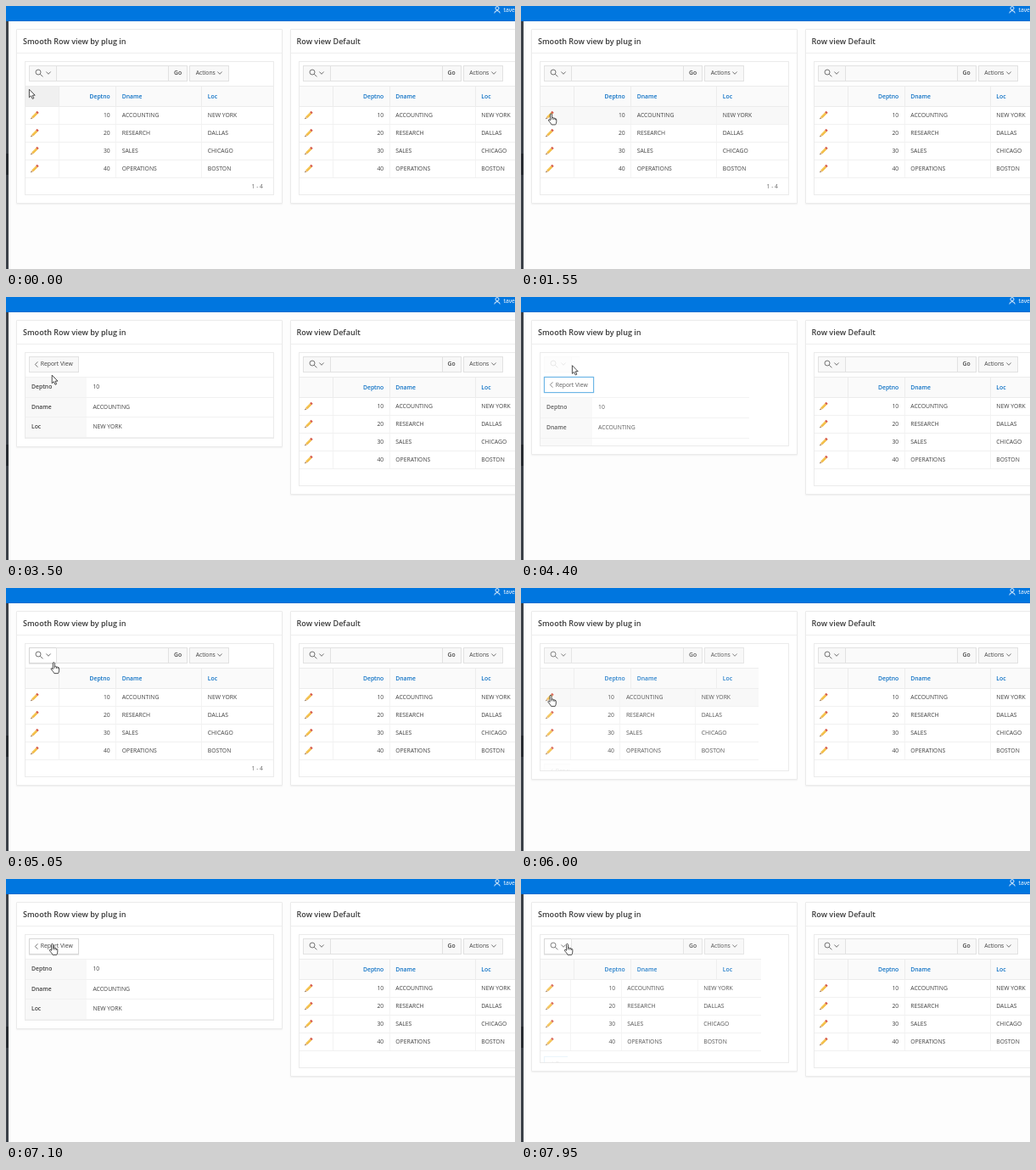
Animation of 600x310 px, one loop 8 s. Source, as an HTML page:

```html
<!DOCTYPE html>
<html lang="en">
<head>
<meta charset="utf-8">
<title>Smooth row view</title>
<style>
  * { box-sizing: border-box; }
  html, body { margin: 0; width: 100%; height: 100%; overflow: hidden; }
  body { background: #fdfdfd; color: #404040; font: 6.8px/1 "Open Sans", "Noto Sans", sans-serif; }
  #stage { position: relative; width: 600px; height: 310px; overflow: hidden; }
  svg { display: block; flex: none; fill: none; overflow: visible; }

  .bar { position: absolute; inset: 0 0 auto; height: 18px; background: #0076df; border-bottom: 1px solid #056dd0; }
  .user { position: absolute; left: 575px; top: 0; display: flex; gap: 3.5px; color: #fff; white-space: nowrap; }
  .user svg { width: 8px; height: 9px; stroke: #fff; stroke-width: .9; }
  .user span { line-height: 9px; }
  .side { position: absolute; left: 0; top: 18px; bottom: 0; width: 3px;
    background: linear-gradient(#3b4048 156px, #262a30 156px 181px, #3b4048 181px); }

  .card { position: absolute; top: 27px; width: 314px; padding: 0 9px 9px; background: #fff;
    border: 1px solid #ebebeb; border-radius: 1px; box-shadow: 0 1px 2px #0000000f; }
  .card h2 { margin: 0 -9px 9px; height: 28px; padding-left: 7px; border-bottom: 1px solid #efefef;
    font-size: 9.05px; font-weight: 600; line-height: 27px; color: #393939; }
  .panel { width: 294px; border: 1px solid #ebebeb; }

  .report, .detail { position: relative; overflow: hidden; --s: 1;
    width: calc(292px * var(--s)); height: calc(var(--h) * var(--s)); opacity: var(--s); }
  .report { --h: 156px; }
  .detail { --h: 100px; }
  .moving .report { --s: var(--report); }
  .moving .detail { --s: calc(1 - var(--report)); }

  .btn { position: absolute; top: 4px; height: 19px; display: flex; align-items: center; justify-content: center;
    gap: 2.5px; padding-top: .5px; background: #f8f8f8; border: 1px solid #e2e2e2; white-space: nowrap; }
  .btn svg { stroke: #666; stroke-width: .9; margin-top: -1px; }
  .btn.hover { background: #fff; border-color: #d6d6d6; box-shadow: 0 1px 1px #00000014; }
  .btn.focus { background: #fff; border-color: #52a9e2; box-shadow: 0 0 1px #52a9e2; }
  .input { background: #fafafa; }
  .go { font-weight: 600; }

  .row { display: flex; height: 21px; border-bottom: 1px solid #f1f1f1; }
  .cell { display: flex; align-items: center; padding: 0 6.5px; border-left: 1px solid #f3f3f3; white-space: nowrap; min-width: 0; }
  .cell:nth-child(1) { width: 13.45%; border-left: 0; padding: 0 6px; }
  .cell:nth-child(2) { width: 22.95%; justify-content: flex-end; }
  .cell:nth-child(3) { width: 34.6%; }
  .cell:nth-child(4) { width: 29%; }
  .head { position: relative; margin-top: 28px; width: 292px; height: 25px; background: #fafafa;
    border: solid #ececec; border-width: 1px 0; color: #0a6fc4; font-weight: 600; }
  .head .cell { border-color: #ececec; padding-top: 1px; }
  .cell.hover { background: #f0f0f0; }
  .row.hover { background: #f8f8f8; }
  .pencil { width: 10px; height: 11px; margin-top: -1px; }
  .foot { height: 19px; line-height: 19px; padding-right: 12px; text-align: right; color: #666; white-space: nowrap; }

  .fields { margin-top: 28px; border-top: 1px solid #f1f1f1; }
  .field { display: flex; height: 23.67px; border-bottom: 1px solid #f1f1f1; white-space: nowrap; }
  .field > * { display: flex; align-items: center; padding-left: 7px; }
  .field b { width: 24.8%; font-weight: 600; background: #f8f8f8; }
  .field.hover { background: #f5f5f5; }
  .field.hover b { background: #eee; }

  #cursor { position: absolute; left: 0; top: 0; pointer-events: none; stroke: #222; stroke-width: .8; fill: #fff; stroke-linejoin: round; }
  #cursor .hand, #cursor.pointing .arrow { display: none; }
  #cursor.pointing .hand { display: inline; }
</style>
</head>
<body>
<div id="stage">
  <div class="side"></div>
  <div class="bar"></div>
  <div class="user">
    <svg viewBox="0 0 8 9"><circle cx="4" cy="2.6" r="2"/><path d="M.8 8.4Q1 5.6 4 5.6T7.2 8.4"/></svg>
    <span>taven</span>
  </div>
  <svg id="cursor" width="12" height="16">
    <path class="arrow" d="M.4.2V9.8L2.6 7.8 4.2 11.4 5.8 10.7 4.3 7.2H7.2Z"/>
    <path class="hand" transform="translate(-4)" d="M3 1.5Q3 .4 4 .4T5 1.5V5.2Q6.9 4.6 7.2 5.7 8.6 5.3 8.9 6.3 10.3 6.1 10.3 7.5V10Q10.2 12 9.2 13.4H4.6Q3.4 11.2 1 8.6 .6 7.4 1.6 7.3 2.4 7.4 3 8.4ZM5 5.2V7.4M7.2 5.7V7.6M8.9 6.3V7.8"/>
  </svg>
</div>
<script>
const LOOP = 8000, FADE = 800;
const stage = document.getElementById('stage');
const cursor = document.getElementById('cursor');

const departments = [
  [10, 'ACCOUNTING', 'NEW YORK'],
  [20, 'RESEARCH', 'DALLAS'],
  [30, 'SALES', 'CHICAGO'],
  [40, 'OPERATIONS', 'BOSTON'],
];
const columns = ['Deptno', 'Dname', 'Loc'];

const icon = (w, h, d) => `<svg width="${w}" height="${h}"><path d="${d}"/></svg>`;
const chevron = icon(6, 4, 'M.4.5L3 3.3 5.6.5');
const lens = icon(10, 10, 'M7 4A3 3 0 1 1 1 4 3 3 0 0 1 7 4M6.2 6.2L9.4 9.4');
const back = icon(4, 7, 'M3.4.3L.4 3.5 3.4 6.7');
const pencil = `<svg class="pencil hit" viewBox="0 0 10 11" pointer-events="bounding-box">
  <rect width="10" height="11"/>
  <path d="M2.3 8.2L7.3 3.2" stroke="#f3bd45" stroke-width="2.8"/>
  <path d="M2 7.3L6.5 2.8" stroke="#fadb85" stroke-width=".8"/>
  <path d="M7.2 3.3L8.7 1.8" stroke="#d65a4a" stroke-width="2.8"/>
  <path d="M1.2 7.3L3.2 9.3.3 10.2Z" fill="#e3b27c"/><path d="M.7 8.9L1.7 9.8.2 10.3Z" fill="#4a3a30"/></svg>`;

const button = (left, width, body, cls = 'hit') =>
  `<div class="btn ${cls}" style="left:${left}px;width:${width}px">${body}</div>`;
const row = (cells, cls, cellCls = '') =>
  `<div class="row ${cls}">${cells.map(c => `<div class="cell ${cellCls}">${c}</div>`).join('')}</div>`;

const report = `<div class="report">
  ${button(4, 33, lens + chevron)}${button(36, 133, '', 'input')}
  ${button(168, 23, 'Go', 'hit go')}${button(193, 47, 'Actions' + chevron)}
  ${row(['', ...columns], 'head', 'spot')}
  ${departments.map(d => row([pencil, ...d], 'spot')).join('')}
  <div class="foot">1 - 4</div></div>`;

const detail = `<div class="detail">
  ${button(4, 59, back + 'Report View', 'hit back')}
  <div class="fields">${columns.map((name, i) =>
    `<div class="field spot"><b>${name}</b><span>${departments[0][i]}</span></div>`).join('')}</div></div>`;

function addCard(left, title, content) {
  const card = document.createElement('section');
  card.className = 'card';
  card.style.left = left + 'px';
  card.innerHTML = `<h2>${title}</h2><div class="panel">${content}</div>`;
  stage.insertBefore(card, cursor);
  return card;
}
const smooth = addCard(12, 'Smooth Row view by plug in', report + detail);
addCard(334.5, 'Row view Default', report);
smooth.classList.add('moving');
const backButton = smooth.querySelector('.back');

// [start time, share of the report view at the end]
const toggles = [[1908, 0], [4194, 1], [5820, 0], [7322, 1]];
// [time, x, y]
const path = [
  [0, 27, 98], [700, 27, 98], [1250, 35.5, 126.5], [3100, 35, 126.5], [3700, 60, 80.5],
  [4900, 60, 80.5], [5500, 35, 126], [6300, 35, 126], [6900, 54.5, 76], [LOOP, 54.5, 76],
];

const clamp = v => Math.min(1, Math.max(0, v));
const swing = p => .5 - Math.cos(clamp(p) * Math.PI) / 2;

function reportShare(t) {
  let share = 1;
  for (const [start, end] of toggles) share += (end - share) * swing((t - start) / FADE);
  return share;
}

function cursorAt(t) {
  const i = path.findIndex(p => p[0] > t);
  const [t0, x0, y0] = path[i - 1], [t1, x1, y1] = path[i];
  const k = swing((t - t0) / (t1 - t0));
  return [x0 + (x1 - x0) * k, y0 + (y1 - y0) * k];
}

function render(t) {
  smooth.style.setProperty('--report', reportShare(t).toFixed(5));
  backButton.classList.toggle('focus',
    toggles.some(([start, end]) => end && t > start - 80 && t < start + FADE));

  const [x, y] = cursorAt(t);
  cursor.style.transform = `translate(${x}px, ${y}px)`;
  const under = document.elementFromPoint(x, y);
  const hit = under && under.closest('.hit');
  const spots = under ? [hit, under.closest('.spot')] : [];
  smooth.querySelectorAll('.hit, .spot').forEach(el => el.classList.toggle('hover', spots.includes(el)));
  cursor.classList.toggle('pointing', !!hit);
}

const begin = performance.now();
function tick() {
  render((performance.now() - begin) % LOOP);
  requestAnimationFrame(tick);
}
tick();
</script>
</body>
</html>
```
